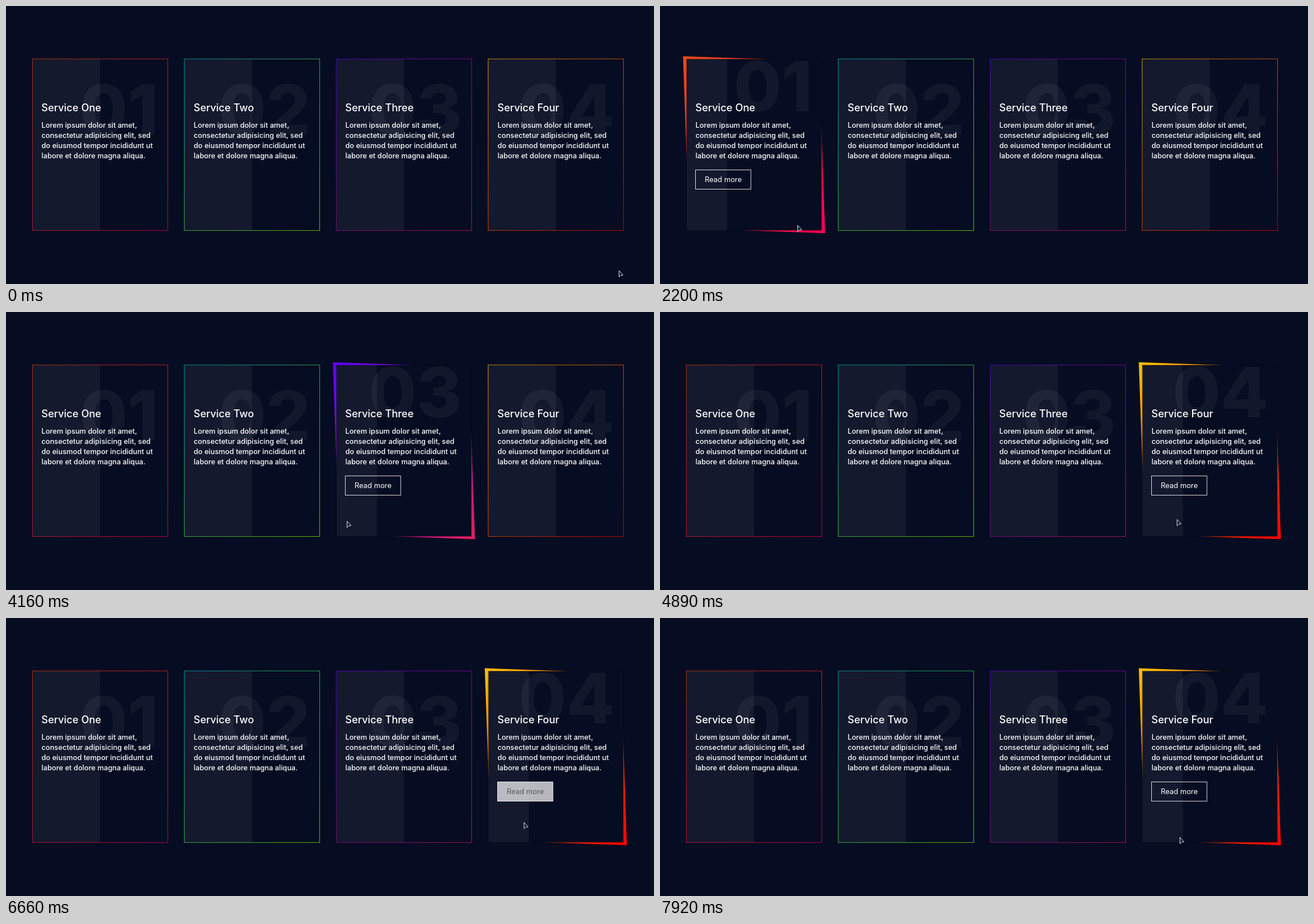
An HTML page that plays this animation: 1141 by 491 pixels, repeating every 8000 ms.

```html
<!DOCTYPE html>
<html lang="en">
<head>
<meta charset="utf-8">
<title>Service cards</title>
<style>
  html, body { margin: 0; width: 100%; height: 100%; overflow: hidden; background: #060c21; }
  svg { display: block; width: 100%; height: 100%; font-family: Inter, "Open Sans", sans-serif; cursor: none; }
  .number { font-size: 122px; font-weight: 800; fill: #fff; fill-opacity: .05; text-anchor: end; }
  .title { font-size: 18px; font-weight: 500; fill: #fff; }
  .copy { font-size: 12.7px; font-weight: 500; fill: #fff; }
  .label { font-size: 12.8px; text-anchor: middle; }
</style>
</head>
<body>
<svg id="stage" viewBox="0 0 1141 491" xmlns="http://www.w3.org/2000/svg"></svg>
<script>
const LOOP = 8000, FADE = 500;
const LEFT = 46, PITCH = 267.5, TOP = 93, WIDTH = 239.3, HEIGHT = 304;
const MID_Y = TOP + HEIGHT / 2, INNER = WIDTH - 2;
const BUTTON = { x: 62.5, y: 289.5, w: 97.5, h: 34 };

const cards = [
  { name: 'One',   from: '#e64a19', to: '#ff0057' },
  { name: 'Two',   from: '#00bcd4', to: '#89ff00' },
  { name: 'Three', from: '#5d02ff', to: '#e91e63' },
  { name: 'Four',  from: '#ffc107', to: '#ff0000' }
];

const copy = [
  'Lorem ipsum dolor sit amet,',
  'consectetur adipisicing elit, sed',
  'do eiusmod tempor incididunt ut',
  'labore et dolore magna aliqua.'
];

// where the pointer rests, from when, until when
const stops = [
  [1079, 467, 0, 70],
  [557, 482, 630, 780],
  [262, 396, 1150, 1150],
  [242, 387, 1900, 2200],
  [393, 389, 2900, 3080],
  [600, 369, 3600, 4160],
  [910, 366, 4400, 5400],
  [925, 304, 5640, 6500],
  [900, 410, 6800, 6800],
  [874, 451, 7230, 7360],
  [895, 390, 7440, 7440],
  [915, 387, 7920, LOOP]
];

const stage = document.getElementById('stage');
const lerp = (a, b, p) => a + (b - a) * p;
const clamp = v => Math.min(1, Math.max(0, v));

// cubic-bezier(.25, .1, .25, 1)
function ease(v) {
  v = clamp(v);
  if (v === 0 || v === 1) return v;
  const curve = (s, a, b) => 3 * a * s * (1 - s) ** 2 + 3 * b * s * s * (1 - s) + s ** 3;
  let lo = 0, hi = 1;
  for (let i = 0; i < 24; i++) {
    const mid = (lo + hi) / 2;
    if (curve(mid, .25, .25) < v) lo = mid; else hi = mid;
  }
  return curve(lo, .1, 1);
}

function pointerAt(t) {
  const i = stops.findIndex(s => t <= s[3]);
  const [x, y, arrive] = stops[i];
  if (t >= arrive) return [x, y];
  const [x0, y0, , leave] = stops[i - 1];
  const p = (t - leave) / (arrive - leave);
  return [lerp(x0, x, p), lerp(y0, y, p)];
}

function inside(box, t) {
  const [x, y] = pointerAt(t);
  return x >= box.x && x < box.x + box.w && y >= box.y && y < box.y + box.h;
}

// times at which the pointer enters (+1) or leaves (-1) a box
function crossings(box) {
  const found = [];
  for (let t = 5; t <= LOOP; t += 5) {
    const change = inside(box, t) - inside(box, t - 5);
    if (change) found.push([t, change]);
  }
  return found;
}

const hoverAmount = (events, t) =>
  events.reduce((sum, [at, change]) => sum + change * ease((t - at) / FADE), 0);

cards.forEach((card, i) => {
  card.x = LEFT + PITCH * i;
  card.cx = card.x + WIDTH / 2;
  card.shift = Math.round(PITCH * i);
  card.button = { ...BUTTON, x: BUTTON.x + card.shift };
  card.events = crossings({ x: card.x, y: TOP, w: WIDTH, h: HEIGHT });
  card.buttonEvents = crossings(card.button);
});

function cardMarkup({ name, from, to, x, cx, shift }, i) {
  const reach = (WIDTH + HEIGHT) / 4;
  const lines = copy.map((s, n) => `<text class="copy" x="62.5" y="${215 + 18 * n}">${s}</text>`).join('');
  return `
    <linearGradient id="g${i}" gradientUnits="userSpaceOnUse"
      x1="${cx - reach}" y1="${MID_Y - reach}" x2="${cx + reach}" y2="${MID_Y + reach}">
      <stop stop-color="${from}"/><stop offset="1" stop-color="${to}"/>
    </linearGradient>
    <rect id="glow${i}" x="${x}" y="${TOP}" width="${WIDTH}" height="${HEIGHT}" fill="url(#g${i})"/>
    <rect x="${x + 1}" y="${TOP + 1}" width="${INNER}" height="${HEIGHT - 2}" fill="#060c21"/>
    <rect x="${x + .5}" y="${TOP + .5}" width="${WIDTH - 1}" height="${HEIGHT - 1}" fill="none" stroke="#000" stroke-opacity=".3"/>
    <rect id="panel${i}" x="${x + 1}" y="${TOP + 1}" height="${HEIGHT - 2}" fill="#fff" fill-opacity=".053"/>
    <g transform="translate(${shift} 0)">
      <text class="number" id="number${i}" x="268">0${i + 1}</text>
      <text class="title" x="62.3" y="186">Service ${name}</text>
      ${lines}
      <g id="button${i}">
        <rect id="face${i}" x="${BUTTON.x}" y="${BUTTON.y}" width="${BUTTON.w}" height="${BUTTON.h}"
          fill="#fff" fill-opacity="0" stroke="#fff" stroke-opacity=".85"/>
        <text class="label" id="label${i}" x="111.3" y="310.5">Read more</text>
      </g>
    </g>`;
}

stage.innerHTML = cards.map(cardMarkup).join('') + `
  <g id="pointer">
    <path id="arrow" d="M.5 .5V11.5L3.4 8.8L7.5 8.2Z" fill="#060c21" stroke="#d3eef4" stroke-linejoin="round"/>
    <path id="hand" d="M0 1Q1 -.5 2 1V4.5L6 5.5Q7.5 6 7 8L6 12H1L-2 8Q-2.5 6 0 7Z" fill="#05070f" stroke="#a9c4cc" stroke-width=".5"/>
  </g>`;

const set = (id, name, value) => document.getElementById(id).setAttribute(name, value);

function draw(t) {
  cards.forEach((card, i) => {
    const h = hoverAmount(card.events, t), b = hoverAmount(card.buttonEvents, t);
    const shade = Math.round(lerp(255, 20, b));
    set('glow' + i, 'transform',
      `translate(${card.cx} ${MID_Y}) skewX(${2 * h}) skewY(${2 * h}) translate(${-card.cx} ${-MID_Y})`);
    set('panel' + i, 'width', INNER * lerp(.5, .3, h));
    set('number' + i, 'y', lerp(227, 186, h));
    set('button' + i, 'opacity', h);
    set('face' + i, 'fill-opacity', b);
    set('label' + i, 'fill', `rgb(${shade},${shade},${shade})`);
  });

  const [x, y] = pointerAt(t);
  const pointing = cards.some(card => inside(card.button, t));
  set('pointer', 'transform', `translate(${x} ${y})`);
  set('arrow', 'visibility', pointing ? 'hidden' : 'visible');
  set('hand', 'visibility', pointing ? 'visible' : 'hidden');
}

let start;
function tick(now) {
  start ??= now;
  draw((now - start) % LOOP);
  requestAnimationFrame(tick);
}
draw(0);
requestAnimationFrame(tick);
</script>
</body>
</html>
```
